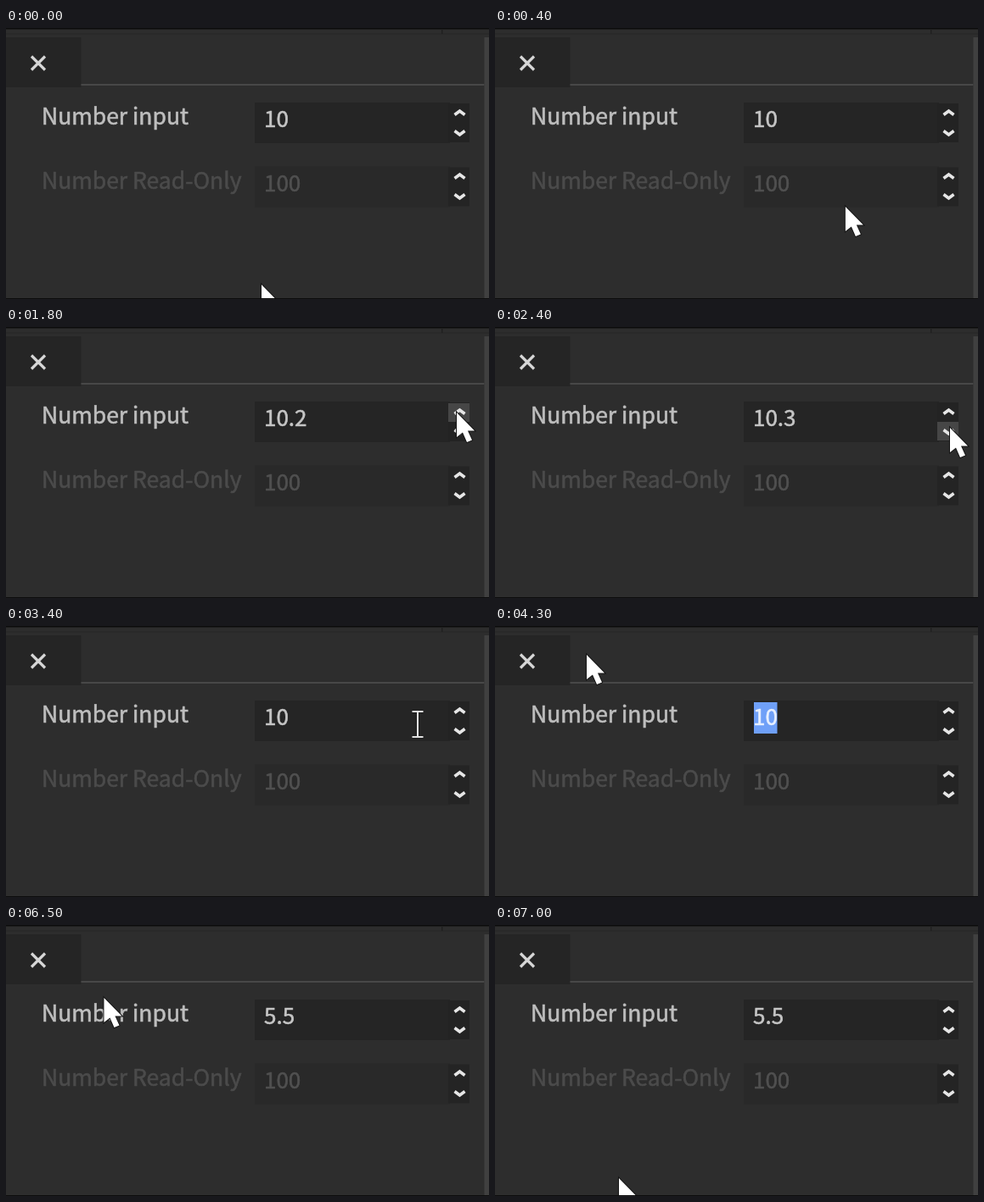
An HTML page with a canvas that plays this animation: 569x320 px, repeating every 7.9 s.

```html
<!DOCTYPE html>
<html lang="en">
<head>
<meta charset="utf-8">
<title>Number input</title>
<style>
html, body { margin: 0; width: 100%; height: 100%; overflow: hidden; background: #2d2d2d; }
canvas { display: block; width: 569px; height: 320px; filter: blur(0.45px); }
</style>
</head>
<body>
<canvas id="stage" width="569" height="320"></canvas>
<script>
const ctx = document.getElementById('stage').getContext('2d');
const LOOP = 7900, STEP = 100;
const FONT = '"Noto Sans CJK JP", "Noto Sans CJK SC", "Noto Sans CJK KR", "Noto Sans CJK TC", "Noto Sans", sans-serif';

const START = { x: 301, y: 302 };
const moves = [
  { from: 0, to: 900, x: 522, y: 120 },     // into the field
  { from: 900, to: 1200, x: 531, y: 100 },  // up button
  { from: 2100, to: 2400, x: 536, y: 118 }, // down button
  { from: 3000, to: 3400, x: 485, y: 116 }, // back to the text
  { from: 3400, to: 3900, x: 98, y: 62 },   // drag to select
  { from: 3900, to: 4200, x: 108, y: 33 },
  { from: 6400, to: 7000, x: 146, y: 298 }
];
const ups = [1400, 1800, 2000], downs = [2700, 2800, 3000], keys = [4400, 4700, 4900];
const TYPED = '5.5';

const within = (t, from, to) => t >= from && t < to;
const passed = (times, t) => times.filter(time => time <= t).length;
const easeOut = k => 1 - (1 - k) ** 1.2;

function pointerAt(t) {
  let { x, y } = START;
  for (const m of moves) {
    const k = easeOut(Math.min(1, Math.max(0, (t - m.from) / (m.to - m.from))));
    x += (m.x - x) * k;
    y += (m.y - y) * k;
  }
  return [x, y];
}

function valueAt(t) {
  const typed = passed(keys, t);
  if (typed) return TYPED.slice(0, typed);
  return String((100 + passed(ups, t) - passed(downs, t)) / 10);
}

function rect(color, x, y, w, h) {
  ctx.fillStyle = color;
  ctx.fillRect(x, y, w, h);
}

function line(color, width, ...points) {
  ctx.strokeStyle = color;
  ctx.lineWidth = width;
  ctx.beginPath();
  points.forEach(([x, y]) => ctx.lineTo(x, y));
  ctx.stroke();
}

// Slightly emboldened text; returns its advance width.
function text(str, x, y, size, color) {
  ctx.font = `${size}px ${FONT}`;
  ctx.fillStyle = ctx.strokeStyle = color;
  ctx.lineWidth = 0.6;
  ctx.fillText(str, x, y);
  ctx.strokeText(str, x, y);
  return ctx.measureText(str).width;
}

function chevron(y, dir) {
  line('#e6e6e6', 3.6, [528.5, y + 2.5 * dir], [534.5, y - 2 * dir], [540.5, y + 2.5 * dir]);
}

function frame() {
  rect('#2d2d2d', 0, 0, 569, 320);
  rect('#0c0c0c', 0, 0, 569, 1.5);
  rect('#292929', 0, 6, 569, 2);
  rect('#202020', 513, 1, 1.5, 6);
  rect('#252525', 0, 11, 88.5, 59);
  rect('#484848', 88.5, 66, 475, 2);
  rect('#404040', 563.5, 11, 6, 308);
  for (const dir of [-1, 1]) line('#d6d6d6', 3.2, [30, 41.5 - 8 * dir], [46, 41.5 + 8 * dir]);
}

function field(y, label, labelColor, fill, buttons) {
  text(label, 42, y + 26, 26.5, labelColor);
  rect(fill, 293, y, 230, 48);
  rect(buttons, 521, y + 1, 25, 46);
}

function arrow(x, y) {
  const shape = [[0, 0], [0, 29], [7, 23.5], [12, 35], [18, 32.5], [13, 21.5], [21, 21.5]];
  ctx.beginPath();
  shape.forEach(([dx, dy]) => ctx.lineTo(x + dx, y + dy + 1));
  ctx.closePath();
  ctx.strokeStyle = '#151515';
  ctx.lineWidth = 2;
  ctx.stroke();
  ctx.fillStyle = '#fff';
  ctx.fill();
}

function beam(x, y) {
  for (const [color, width] of [['#202020', 4], ['#e2e2e2', 2]]) {
    line(color, width, [x, y - 15], [x, y + 15]);
    for (const end of [-15, 15]) line(color, width, [x - 6.5, y + end], [x + 6.5, y + end]);
  }
}

function draw(t) {
  const selected = within(t, 3600, keys[0]);
  const caret = within(t, keys[0], 5200) || within(t, 5500, 5800);
  const isBeam = within(t, 900, 1000) || within(t, 3300, 3900);

  frame();
  field(88, 'Number input', '#bebebe', '#252525', '#232323');
  field(163.5, 'Number Read-Only', '#4b4b4b', '#292929', '#242424');

  if (within(t, 1000, 2300)) rect('#464646', 521, 90, 25, 22);
  if (within(t, 2300, 3200)) rect('#464646', 521, 112, 25, 22);
  for (const top of [100, 175]) {
    chevron(top, 1);
    chevron(top + 24, -1);
  }

  if (selected) rect('#6fa0f8', 305, 90, 27.5, 37);
  const width = text(valueAt(t), 304, 117, 26, selected ? '#e8f0ff' : '#c6c6c6');
  if (caret) rect('#d0d0d0', 304 + width, 90, 2, 36);
  text('100', 304, 193, 26, '#505050');

  (isBeam ? beam : arrow)(...pointerAt(t));
  rect('#0c0c0c', 0, 319, 569, 1);
}

function tick() {
  const t = performance.now() % LOOP;
  draw(Math.floor(t / STEP) * STEP);
  requestAnimationFrame(tick);
}
tick();
</script>
</body>
</html>
```
